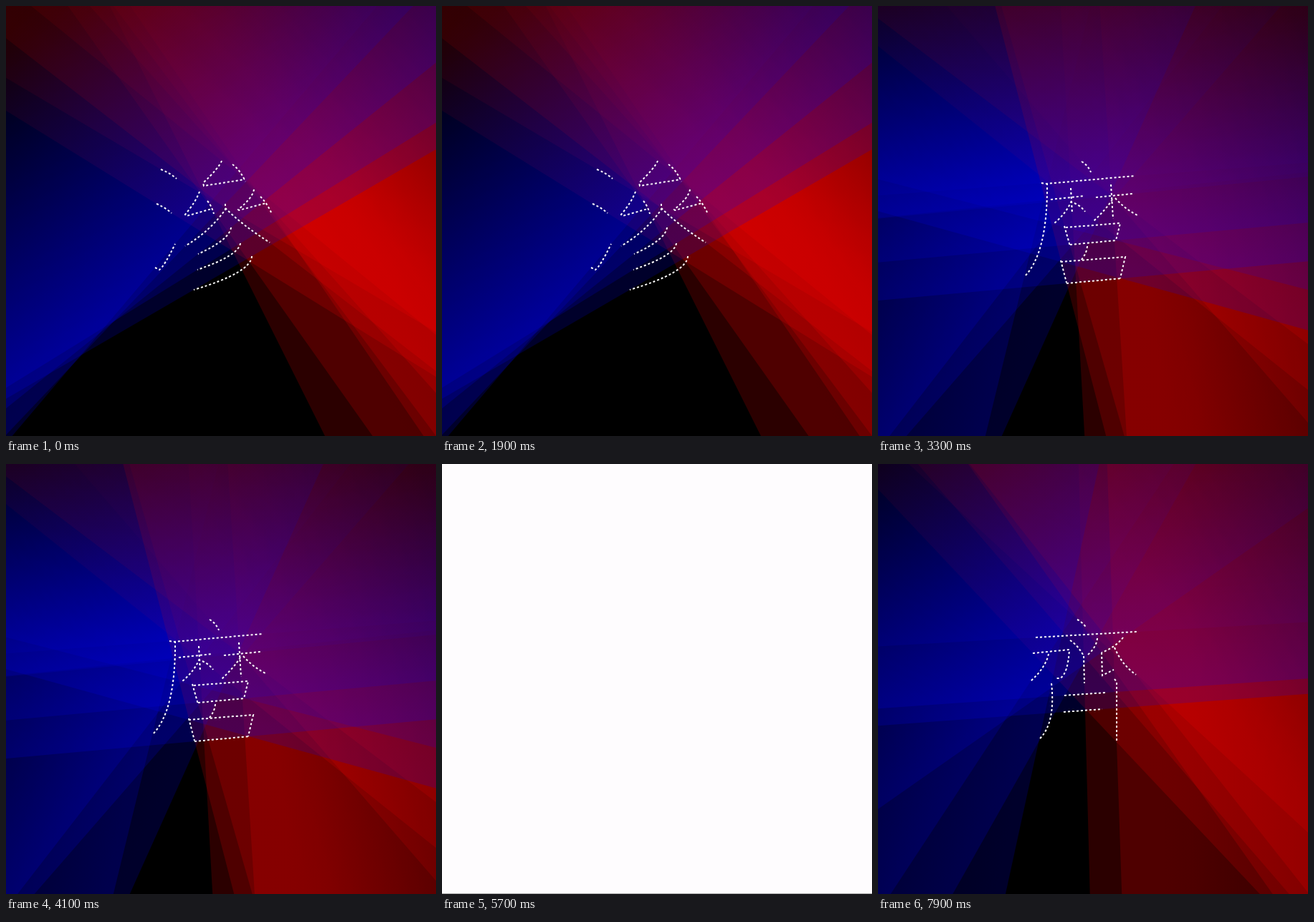
Recreate the animation shown at these times as an HTML page with a canvas. Size 600 px wide and 600 px high, loop 8 s.

```html
<!DOCTYPE html>
<html>
<head>
<meta charset="utf-8">
<style>
  html, body { margin: 0; width: 100%; height: 100%; overflow: hidden; background: #000; }
  canvas { display: block; width: 600px; height: 600px; }
</style>
</head>
<body>
<canvas id="stage" width="600" height="600"></canvas>
<script>
const SIZE = 600, LOOP = 8000, ALPHA = 0.17;
const ctx = document.getElementById('stage').getContext('2d');

// Each glyph is a list of pen strokes in writing order.
const glyphs = [
  [
    'M216 228Q229 233 238 241',
    'M210 276Q222 281 231 289',
    'M208 365L214 368Q221 363 236 332',
    'M301 216Q297 226 275 247L276 251L333 242',
    'M316 221Q327 229 334 245',
    'M270 259Q265 273 250 291L252 293L287 283',
    'M281 272Q287 279 290 290',
    'M346 256Q344 268 324 284L325 285L363 275',
    'M355 266Q364 275 370 288',
    'M306 276L306 284Q285 314 250 335',
    'M306 282Q330 306 368 330',
    'M314 309Q312 326 268 346',
    'M327 331Q325 348 267 368',
    'M343 349Q342 372 262 396'
  ],
  [
    'M284 217Q293 222 297 232',
    'M228 247L235 248L358 237',
    'M236 247Q237 345 204 378',
    'M241 270L288 265',
    'M269 254L271 290',
    'M270 272Q262 290 246 303',
    'M274 275Q283 279 289 287',
    'M304 267L355 262',
    'M325 249L328 297',
    'M327 270Q318 284 300 301',
    'M331 268Q345 284 364 293',
    'M260 307L268 335',
    'M262 309L338 303L332 327',
    'M268 333L333 327',
    'M292 335Q291 346 283 355',
    'M255 355L263 386',
    'M255 357L345 350L338 380',
    'M263 387L340 380'
  ],
  [
    'M278 217Q286 221 291 229',
    'M220 242L361 234',
    'M216 264L267 259Q265 293 254 299L249 299',
    'M238 265Q234 284 213 303',
    'M268 246Q280 254 287 268',
    'M287 268L288 306',
    'M306 243Q305 255 293 266',
    'M342 242Q331 256 312 263',
    'M312 263L313 295L329 287',
    'M330 256Q340 280 360 294',
    'M242 306Q248 362 225 384',
    'M330 300L333 304L333 388',
    'M260 323L317 319',
    'M259 346L313 342'
  ]
];

// Light fades to black with distance from the line.
function fade(color, near, far) {
  const g = ctx.createLinearGradient(0, -near, 0, -far);
  g.addColorStop(0, color);
  g.addColorStop(1, '#000');
  return g;
}
const red = fade('#f00', 100, 650);
const blue = fade('#00f', 10, 410);

// Floods the side above the line through a stroke's two ends.
function flood(path) {
  const n = path.match(/\d+/g).map(Number);
  const [x, y] = n, [ex, ey] = n.slice(-2);
  const slope = (ey - y) / (ex - x);
  ctx.save();
  ctx.translate(x, y);
  ctx.rotate(Math.atan(slope));
  ctx.globalAlpha = ALPHA;
  ctx.fillStyle = slope > 0.4 ? red : blue;
  ctx.fillRect(-1500, -1500, 3000, 1500);
  ctx.restore();
}

function drawGlyph(paths) {
  ctx.fillStyle = '#000';
  ctx.fillRect(0, 0, SIZE, SIZE);
  paths.forEach(flood);
  ctx.strokeStyle = '#fff';
  ctx.lineWidth = 2;
  ctx.setLineDash([3, 3]);
  paths.forEach(p => ctx.stroke(new Path2D(p)));
}

function drawBlank() {
  ctx.fillStyle = '#fefcfe';
  ctx.fillRect(0, 0, SIZE, SIZE);
  ctx.fillStyle = '#aaa';
  ctx.fillRect(0, SIZE - 1, SIZE, 1);
}

// [end time, glyph index or -1 for the blank page]
const scenes = [[2000, 0], [2500, -1], [5700, 1], [6100, -1], [LOOP, 2]];
let shown = null;

function frame(now) {
  const t = now % LOOP;
  const scene = scenes.find(s => t < s[0]);
  if (scene !== shown) {
    shown = scene;
    if (scene[1] < 0) drawBlank();
    else drawGlyph(glyphs[scene[1]]);
  }
  requestAnimationFrame(frame);
}
frame(performance.now());
</script>
</body>
</html>
```
